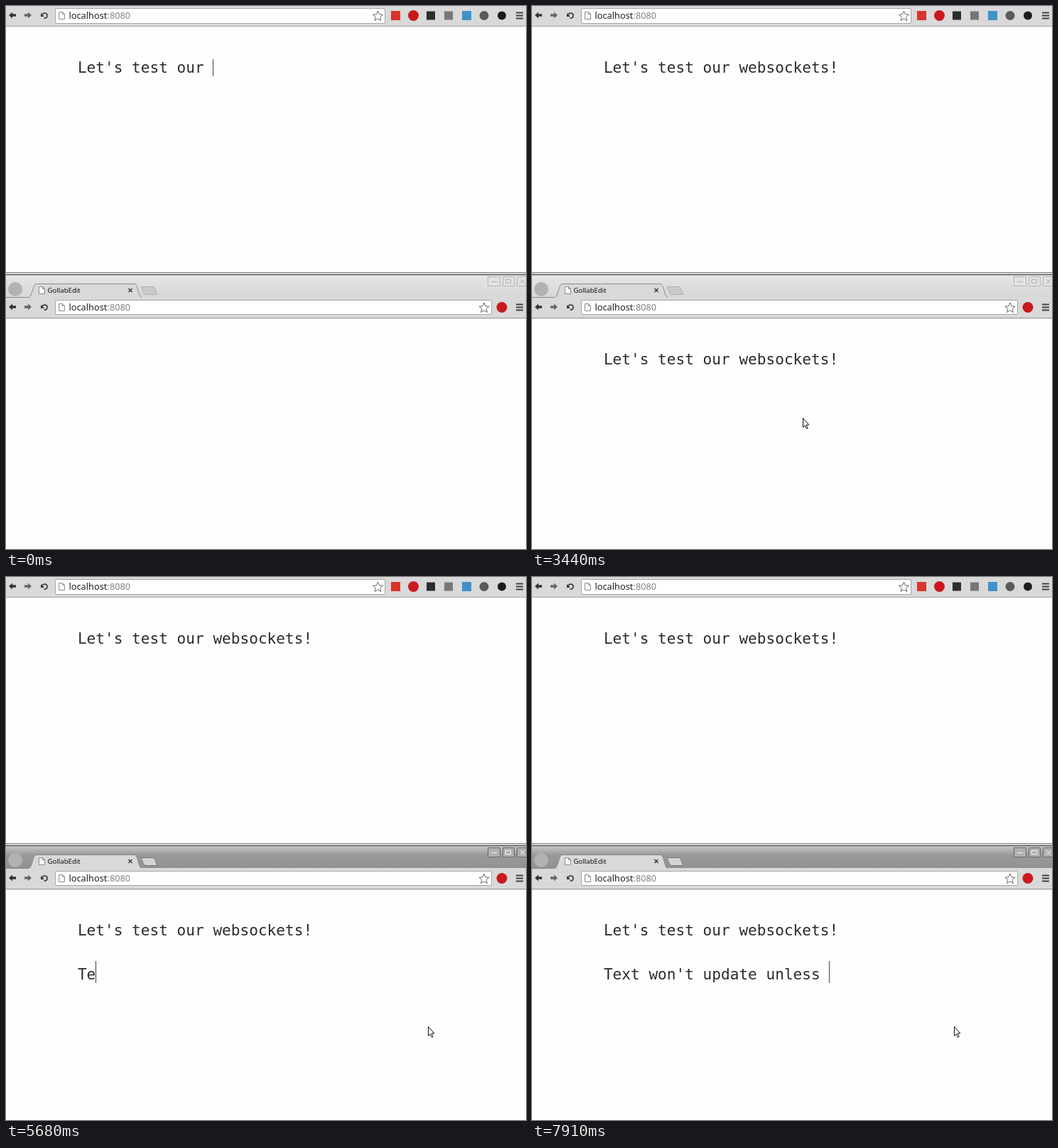
An HTML page that plays this animation: 732 by 765 pixels, repeating every 8000 ms.

```html
<!DOCTYPE html>
<html lang="en">
<head>
<meta charset="utf-8">
<title>Shared editor</title>
<style>
  html, body { margin: 0; width: 100%; height: 100%; overflow: hidden; background: #fefefe; }
  svg { display: block; }
  text { white-space: pre; }
  .code { font: 21.1px "DejaVu Sans Mono", monospace; fill: #2b2b2b; }
  .url { font: 12.8px "Noto Sans", sans-serif; fill: #222; }
  .tab { font: 9.6px "Noto Sans", sans-serif; fill: #111; }
</style>
</head>
<body>
<svg width="732" height="765" viewBox="0 0 732 765">
  <defs>
    <linearGradient id="focused" x2="0" y2="1">
      <stop offset="0" stop-color="#c6c6c6"/>
      <stop offset=".4" stop-color="#999"/>
      <stop offset="1" stop-color="#929292"/>
    </linearGradient>
    <linearGradient id="blurred" x2="0" y2="1">
      <stop offset="0" stop-color="#e6e6e6"/>
      <stop offset=".4" stop-color="#dfdfdf"/>
      <stop offset="1" stop-color="#d8d8d8"/>
    </linearGradient>
    <path id="page" d="M.5.5h5l3 3v7h-8zM5.5.5v3h3" fill="#fff" stroke="#8a8a8a"/>
    <path id="star" d="M0-7 2-2.2 7-1.8 3.2 1.6 4.4 6.5 0 3.8-4.4 6.5-3.2 1.6-7-1.8-2-2.2z" fill="#fff" stroke="#666"/>
    <path id="arrow" d="M-5 0 0-4.5V-1.7H5V1.7H0V4.5z"/>
    <g id="controls">
      <use href="#arrow" x="9" y="13" fill="#333"/>
      <use href="#arrow" transform="translate(31 13) scale(-1 1)" fill="#666"/>
      <path d="M51 12.5C52 9 58 9 58 13.5 58 16 56 17.5 53.5 17" fill="none" stroke="#333" stroke-width="1.6"/>
      <path d="M49 10v5h5z" fill="#333"/>
      <path d="M718 9.5h10M718 13.5h10M718 17.5h10" stroke="#444" stroke-width="2"/>
    </g>
    <g id="address">
      <use href="#page" x="74" y="8"/>
      <text class="url" x="88.4" y="18">localhost<tspan fill="#808080">:8080</tspan></text>
    </g>
  </defs>

  <rect width="732" height="765" fill="#fefefe"/>

  <!-- upper window -->
  <rect width="732" height="28" fill="#d9d9d9"/>
  <rect y="28" width="732" height="1" fill="#a2a2a2"/>
  <rect x="69.5" y="3.5" width="464" height="21" rx="1.5" fill="#fff" stroke="#a6a6a6"/>
  <use href="#controls"/>
  <use href="#address"/>
  <use href="#star" x="523.5" y="14"/>
  <rect x="542" y="7" width="13" height="13" fill="#d8352c"/>
  <circle cx="573.5" cy="13.5" r="7.5" fill="#c9191e"/>
  <rect x="592" y="7.5" width="12" height="12" fill="#2c2c2c"/>
  <rect x="617" y="7.5" width="12" height="12" fill="#777"/>
  <rect x="642" y="7" width="13" height="13" fill="#3f92c8"/>
  <circle cx="673" cy="13.5" r="6.5" fill="#5a5a5a"/>
  <circle cx="698" cy="13.5" r="6" fill="#1c1c1c"/>

  <!-- lower window -->
  <rect y="375" width="732" height="5" fill="#d6d6d6"/>
  <rect y="375" width="732" height="1" fill="#858585"/>
  <rect y="378" width="732" height="1.4" fill="#484848"/>
  <rect id="titlebar" y="379.4" width="732" height="31"/>
  <circle cx="13" cy="399" r="10" fill="#b2b2b2"/>
  <path d="M0 410H33C37 409 38 392 42 391.5H181C186 392 186 409 191 410H732V439H0z" fill="#d9d9d9"/>
  <path d="M0 410.5H32C37 409 38 392 42 391.5H181C186 392 186 409 191 410.5" fill="none" stroke="#8b8b8b"/>
  <path id="newTab" d="M190 395.5H207C210 395.5 211 403 213 406.5H197C193 406.5 192 399 190 395.5z"/>
  <use href="#page" x="46" y="395"/>
  <text class="tab" x="58.6" y="404">GollabEdit</text>
  <path d="M172.5 398l5 5m0-5l-5 5" stroke="#333" stroke-width="1.4"/>
  <g id="buttons">
    <path d="M678.5 381.5h17v13h-17zM699.5 381.5h16v13h-16zM719.5 381.5h17v13h-17z"/>
    <path id="glyphs" d="M683 388.5h8M703.5 385.5h7v5h-7zM724 385l6 6m0-6l-6 6" fill="none"/>
  </g>
  <rect y="439" width="732" height="1.4" fill="#a2a2a2"/>
  <rect x="69.5" y="414.5" width="614" height="20" rx="1.5" fill="#fff" stroke="#a6a6a6"/>
  <use href="#controls" y="411"/>
  <use href="#address" y="411"/>
  <use href="#star" x="673" y="425"/>
  <circle cx="698" cy="424.5" r="7.5" fill="#c9191e"/>

  <text class="code" id="upper" x="100.9" y="94"></text>
  <text class="code" id="lower" x="100.9" y="505"></text>
  <text class="code" id="reply" x="100.9" y="567"></text>
  <rect id="caret" width="1" fill="#444"/>
  <path id="pointer" d="M.5.5V13.5L3.3 10.8 5.3 15.5 7.2 14.7 5.2 10H8.8z" fill="#fff" stroke="#111"/>
</svg>
<script>
const LOOP = 8000;
const LEFT = 100.9, ADVANCE = 12.7;
const GREETING = "Let's test our websockets!";
const REPLY = "Text won't update unless ";
const $ = id => document.getElementById(id);

// Each track lists [start time, value]; values hold until the next entry.
const greetingTrack = [[0, 15], [150, 16], [300, 17], [450, 18], [750, 20],
  [1200, 21], [1350, 23], [1490, 24], [1640, 26]];
const draftTrack = [[0, ""], [4630, "T"], [4780, "Th"], [4930, "Thi"], [5080, "This"],
  [5380, "Th"], [5530, "T"],
  ...[[5680, 2], [5830, 3], [5980, 4], [6130, 6], [6270, 7], [6420, 10], [6570, 11],
    [6720, 13], [6870, 15], [7010, 17], [7160, 19], [7460, 20], [7610, 22], [7760, 24], [7910, 25]]
    .map(([time, count]) => [time, REPLY.slice(0, count)])];
const caretTrack = [[0, "upper"], [2240, ""], [2840, "upper"], [3290, ""],
  [3590, "lower"], [4190, "blank"], [4340, "reply"]];
const pointerTrack = [[0, null], [3140, [352, 250]], [3290, [362, 415]], [3440, [381, 580]],
  [3590, [404, 597]], [3740, [594, 633]]];
const caretBox = { upper: [75, 24], lower: [486, 24], blank: [510, 31], reply: [541, 31] };

const at = (track, t) => track.findLast(([start]) => start <= t)[1];

function set(id, attributes) {
  for (const name in attributes) $(id).setAttribute(name, attributes[name]);
}

function draw(t) {
  const count = at(greetingTrack, t);
  const draft = at(draftTrack, t);
  const caret = at(caretTrack, t);
  const pointer = at(pointerTrack, t);
  const focused = t >= 3590;

  $("upper").textContent = GREETING.slice(0, count);
  $("lower").textContent = t >= 2840 ? GREETING : "";
  $("reply").textContent = draft;

  const [y, height] = caretBox[caret] || [0, 0];
  const column = { upper: count, lower: GREETING.length, reply: draft.length }[caret] || 0;
  set("caret", { x: Math.round(LEFT + ADVANCE * column), y, height });

  set("pointer", {
    visibility: pointer ? "visible" : "hidden",
    transform: `translate(${pointer || [0, 0]})`
  });
  set("titlebar", { fill: `url(#${focused ? "focused" : "blurred"})` });
  set("newTab", { fill: focused ? "#d3d3d3" : "#cacaca", stroke: focused ? "#777" : "#b0b0b0" });
  set("buttons", { fill: focused ? "#b0b0b0" : "#e2e2e2", stroke: focused ? "#686868" : "#b4b4b4" });
  set("glyphs", { stroke: focused ? "#f4f4f4" : "#b0b0b0" });
}

const begin = performance.now();
function tick() {
  draw((performance.now() - begin) % LOOP);
  requestAnimationFrame(tick);
}
tick();
</script>
</body>
</html>
```
